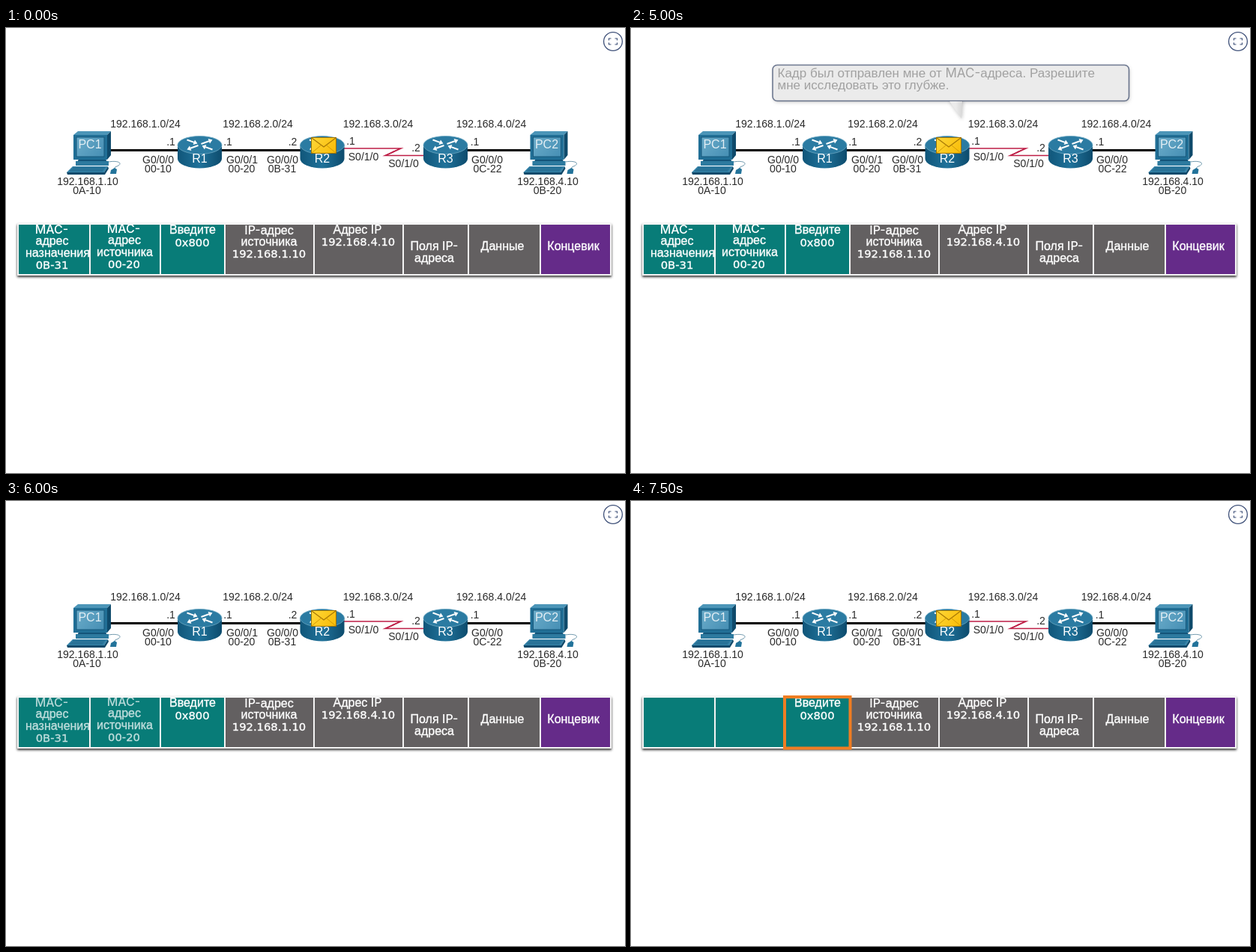
An HTML page with a canvas for the animation above (8 s loop, 826 by 595 pixels).

```html
<!DOCTYPE html>
<html lang="ru">
<head>
<meta charset="utf-8">
<title>Путь пакета через маршрутизатор</title>
<style>
html, body { margin: 0; width: 100%; height: 100%; overflow: hidden; background: #fff; }
canvas { display: block; width: 826px; height: 595px; }
</style>
</head>
<body>
<canvas id="stage" width="826" height="595"></canvas>
<script>
const ctx = document.getElementById('stage').getContext('2d');
const LOOP = 8000;
const SANS = '"Liberation Sans", Arial, sans-serif';
const LATIN = 'Inter, sans-serif';
const DIGITS = '"DejaVu Sans", sans-serif';
const TEAL = '#087c78', GRAY = '#636061', PURPLE = '#652b89';

// x, width, colour, then text lines as [text, centre x, baseline]
const CELLS = [
  [17, 94, TEAL, [['MAC-', 61, 275], ['адрес', 61.5, 290], ['назначения', 69, 306], ['0B-31', 61.5, 322]]],
  [113, 92, TEAL, [['MAC-', 157, 274], ['адрес', 158, 289], ['источника', 158.5, 305], ['00-20', 157.5, 321]]],
  [207, 84, TEAL, [['Введите', 249, 275], ['0x800', 248.5, 292]]],
  [293, 117, GRAY, [['IP-адрес', 351, 276], ['источника', 351, 291], ['192.168.1.10', 351, 307]]],
  [412, 117, GRAY, [['Адрес IP', 469, 275], ['192.168.4.10', 470, 291]]],
  [531, 85, GRAY, [['Поля IP-', 571.5, 297], ['адреса', 571.5, 313]]],
  [618, 94, GRAY, [['Данные', 662.5, 297]]],
  [714, 92, PURPLE, [['Концевик', 757, 297]]]
];

// text, centre x, baseline
const LABELS = [
  ['192.168.1.0/24', 186, 133], ['192.168.2.0/24', 336, 133],
  ['192.168.3.0/24', 496.5, 133], ['192.168.4.0/24', 647.5, 133],
  ['192.168.1.10', 109, 210], ['0A-10', 108, 222],
  ['192.168.4.10', 723, 210], ['0B-20', 722.5, 222],
  ['G0/0/0', 203, 181], ['00-10', 203, 193], ['G0/0/1', 315, 181], ['00-20', 314.5, 193],
  ['G0/0/0', 369, 181], ['0B-31', 368.5, 193], ['G0/0/0', 642, 181], ['0C-22', 642.5, 193],
  ['S0/1/0', 477, 177], ['S0/1/0', 530.5, 186],
  ['.1', 220, 157], ['.1', 296, 157], ['.2', 382.5, 157],
  ['.1', 460, 156], ['.2', 547, 165], ['.1', 625.5, 157]
];

const rgba = (r, g, b, a) => `rgba(${r},${g},${b},${a})`;

function poly(points, fill, stroke, width = 1, close = true) {
  ctx.beginPath();
  points.forEach(([x, y], i) => i ? ctx.lineTo(x, y) : ctx.moveTo(x, y));
  if (close) ctx.closePath();
  if (fill) { ctx.fillStyle = fill; ctx.fill(); }
  if (stroke) { ctx.strokeStyle = stroke; ctx.lineWidth = width; ctx.stroke(); }
}

const line = (points, color, width) => poly(points, null, color, width, false);

function rect(x, y, w, h, fill) {
  ctx.fillStyle = fill;
  ctx.fillRect(x, y, w, h);
}

function ellipse(x, y, rx, ry, fill, stroke, width = 1) {
  ctx.beginPath();
  ctx.ellipse(x, y, rx, ry, 0, 0, Math.PI * 2);
  ctx.fillStyle = fill;
  ctx.fill();
  ctx.strokeStyle = stroke;
  ctx.lineWidth = width;
  ctx.stroke();
}

function gradient(x0, y0, x1, y1, ...colors) {
  const g = ctx.createLinearGradient(x0, y0, x1, y1);
  colors.forEach((c, i) => g.addColorStop(i / (colors.length - 1), c));
  return g;
}

function text(str, x, y, size, color) {
  ctx.font = `${size}px ${SANS}`;
  ctx.textAlign = 'center';
  ctx.fillStyle = color;
  ctx.fillText(str, x, y);
}

// Cyrillic, Latin and numeric runs use different faces
function runStyle(run, size, weight) {
  if (/[А-Яа-я]/.test(run)) return { font: `${size}px ${SANS}`, thin: true };
  if (/\d/.test(run)) return { font: `${size * 0.92}px ${DIGITS}`, thin: true };
  return { font: `${weight} ${size}px ${LATIN}`, thin: false };
}

function mixedText(str, x, y, size, color, { weight = 400, center = false, bold = 0 } = {}) {
  const runs = str.split(/([А-Яа-я. ]*[А-Яа-я][А-Яа-я. ]*)/).filter(Boolean).map(run => {
    const style = runStyle(run, size, weight);
    ctx.font = style.font;
    return { run, ...style, width: ctx.measureText(run).width };
  });
  if (center) x -= runs.reduce((sum, r) => sum + r.width, 0) / 2;
  ctx.textAlign = 'left';
  ctx.fillStyle = ctx.strokeStyle = color;
  ctx.lineWidth = bold;
  for (const r of runs) {
    ctx.font = r.font;
    ctx.fillText(r.run, x, y);
    if (bold && r.thin) ctx.strokeText(r.run, x, y);
    x += r.width;
  }
}

function drawComputer(x, name) {
  ctx.save();
  ctx.translate(x, 0);
  // stand and keyboard
  poly([[8, 174], [42, 174], [47, 182], [3, 182]], '#14557a');
  poly([[3, 178], [47, 178], [47, 184], [3, 184]], '#2d7a9f');
  poly([[-1, 185], [46, 185], [41, 193], [-9, 193]], '#3583a9');
  poly([[-9, 193], [41, 193], [46, 185], [47, 188], [42, 196], [-8, 196]], '#0f4a6b');
  for (let i = 0; i < 3; i++)
    line([[-1 - i * 2, 187 + i * 2], [42 - i * 1.3, 187 + i * 2]], '#175b7f', 0.8);
  // monitor
  poly([[0, 143], [6, 138], [50, 138], [45, 143]], '#4c95b8');
  poly([[45, 143], [50, 138], [50, 170], [45, 176]], '#0f4a6b');
  rect(0, 143, 45, 33, '#216f96');
  rect(4, 146, 37, 26, gradient(4, 146, 41, 172, '#6aabc9', '#468fb4'));
  ctx.strokeStyle = '#17587c';
  ctx.lineWidth = 1;
  ctx.strokeRect(4, 146, 37, 26);
  // mouse and cable
  ctx.beginPath();
  ctx.moveTo(47, 179);
  ctx.bezierCurveTo(58, 177, 66, 180, 60, 184);
  ctx.quadraticCurveTo(55, 185, 54, 189);
  ctx.strokeStyle = '#4d7f98';
  ctx.lineWidth = 0.8;
  ctx.stroke();
  poly([[50, 190], [55, 187], [58, 189], [57, 195], [49, 195]], '#23739a');
  text(name, 22, 161, 16, '#e3eef4');
  ctx.restore();
}

function drawArrow(x0, y0, x1, y1) {
  const len = Math.hypot(x1 - x0, y1 - y0);
  const ux = (x1 - x0) / len, uy = (y1 - y0) / len;
  const bx = x1 - ux * 5, by = y1 - uy * 5;
  line([[x0, y0], [bx, by]], '#fff', 2);
  poly([[x1, y1], [bx - uy * 3.5, by + ux * 3.5], [bx + uy * 3.5, by - ux * 3.5]], '#fff');
}

function drawRouter(x) {
  ctx.beginPath();
  ctx.moveTo(x - 29.5, 156);
  ctx.lineTo(x - 29.5, 175);
  ctx.ellipse(x, 175, 29.5, 12.5, 0, Math.PI, 0, true);
  ctx.lineTo(x + 29.5, 156);
  ctx.fillStyle = gradient(x - 29, 0, x + 29, 0, '#10567a', '#20729a', '#0d4c6e');
  ctx.fill();
  ellipse(x, 156.5, 29.5, 12, '#2b7ba2', '#6ba7c2', 0.8);
  // inward along one diagonal, outward along the other
  for (const s of [-1, 1]) {
    drawArrow(x + s * 17, 156 + s * 6.5, x + s * 3, 156 + s * 1.5);
    drawArrow(x + s * 2, 156 - s, x + s * 17, 156 - s * 6.5);
  }
}

function drawEnvelope() {
  rect(407, 146, 34, 22, gradient(407, 146, 441, 168, '#ffd83a', '#f8bb05'));
  line([[408, 167], [420, 157]], '#d29a06', 1);
  line([[440, 167], [428, 157]], '#d29a06', 1);
  line([[408, 147], [424, 159], [440, 147]], '#a77805', 1.2);
  ctx.strokeStyle = '#9b7207';
  ctx.lineWidth = 1;
  ctx.strokeRect(407.5, 146.5, 33, 21);
}

function drawNetwork() {
  for (const [a, b] of [[139, 232], [286, 396], [614, 702]])
    line([[a, 163.5], [b, 163.5]], '#000', 3);
  line([[450, 161], [527, 161], [506, 170.5], [559, 170.5]], '#bd1d45', 1.6);
  poly([[527, 160.5], [516, 167], [506, 171], [517, 164.5]], '#bd1d45');
  drawComputer(90, 'PC1');
  drawComputer(699.5, 'PC2');
  for (const [x, name] of [[258.5, 'R1'], [422, 'R2'], [586.5, 'R3']]) {
    drawRouter(x);
    if (name === 'R2') drawEnvelope();
    text(name, x, 180, 16, '#fff');
  }
  for (const [str, x, y] of LABELS) text(str, x, y, 14, '#2b2b2b');
}

function drawExpandIcon() {
  ellipse(810, 18, 12.4, 12.4, '#fff', '#40527a', 1.3);
  for (const sx of [-1, 1])
    for (const sy of [-1, 1])
      line([[810 + sx * 2.5, 18 + sy * 4], [810 + sx * 5.5, 18 + sy * 4], [810 + sx * 5.5, 18 + sy * 1.5]], '#40527a', 1.2);
}

function drawTable(addressAlpha) {
  ctx.save();
  ctx.shadowColor = 'rgba(0,0,0,.8)';
  ctx.shadowBlur = 3;
  ctx.shadowOffsetY = 2;
  rect(15, 261, 793, 70, '#f4f4f4');
  ctx.restore();
  CELLS.forEach(([x, w, color, lines], i) => {
    rect(x, 263, w, 66, color);
    const ink = rgba(255, 255, 255, i < 2 ? addressAlpha : 1);
    for (const [str, cx, y] of lines)
      mixedText(str, cx, y, 16, ink, { weight: 500, center: true, bold: 0.35 });
  });
}

function drawBubble({ fill, border, ink, shade }) {
  const tail = gradient(424, 0, 443, 0, fill, fill, '#d4d4d4');
  ctx.save();
  ctx.shadowColor = rgba(0, 0, 0, shade);
  ctx.shadowBlur = 4;
  ctx.shadowOffsetX = 1;
  ctx.shadowOffsetY = 2;
  poly([[423, 96], [441, 121], [443, 96]], tail);
  ctx.beginPath();
  ctx.roundRect(189, 49.5, 475.5, 48, 6);
  ctx.fillStyle = fill;
  ctx.fill();
  ctx.restore();
  ctx.strokeStyle = rgba(24, 42, 82, border);
  ctx.lineWidth = 1.6;
  ctx.stroke();
  poly([[425, 98], [440.5, 119], [442, 98]], tail);
  const color = rgba(60, 60, 60, ink);
  mixedText('Кадр был отправлен мне от MAC-адреса. Разрешите', 195.5, 66, 17, color);
  mixedText('мне исследовать это глубже.', 195.5, 82, 17, color);
}

function bubbleStyle(t) {
  if (t < 1000 || t >= 5250) return null;
  if (t < 1250) return { fill: '#e8e8e8', border: 0.36, ink: 0.32, shade: 0.18 };
  if (t < 5000) return { fill: '#fff', border: 1, ink: 1, shade: 0.5 };
  return { fill: '#ebebeb', border: 0.6, ink: 0.42, shade: 0.2 };
}

function addressAlpha(t) {
  if (t < 6000) return 1;
  return t < 6250 ? 0.7 : t < 6500 ? 0.3 : 0;
}

function draw(t) {
  rect(0, 0, 826, 595, '#fff');
  drawExpandIcon();
  const style = bubbleStyle(t);
  if (style) drawBubble(style);
  drawNetwork();
  drawTable(addressAlpha(t));
  if (t >= 7000) {
    ctx.strokeStyle = '#f07d22';
    ctx.lineWidth = 4;
    ctx.strokeRect(205, 262, 87.5, 68.5);
  }
}

const start = performance.now();
function tick() {
  draw((performance.now() - start) % LOOP);
  requestAnimationFrame(tick);
}
tick();
</script>
</body>
</html>
```
